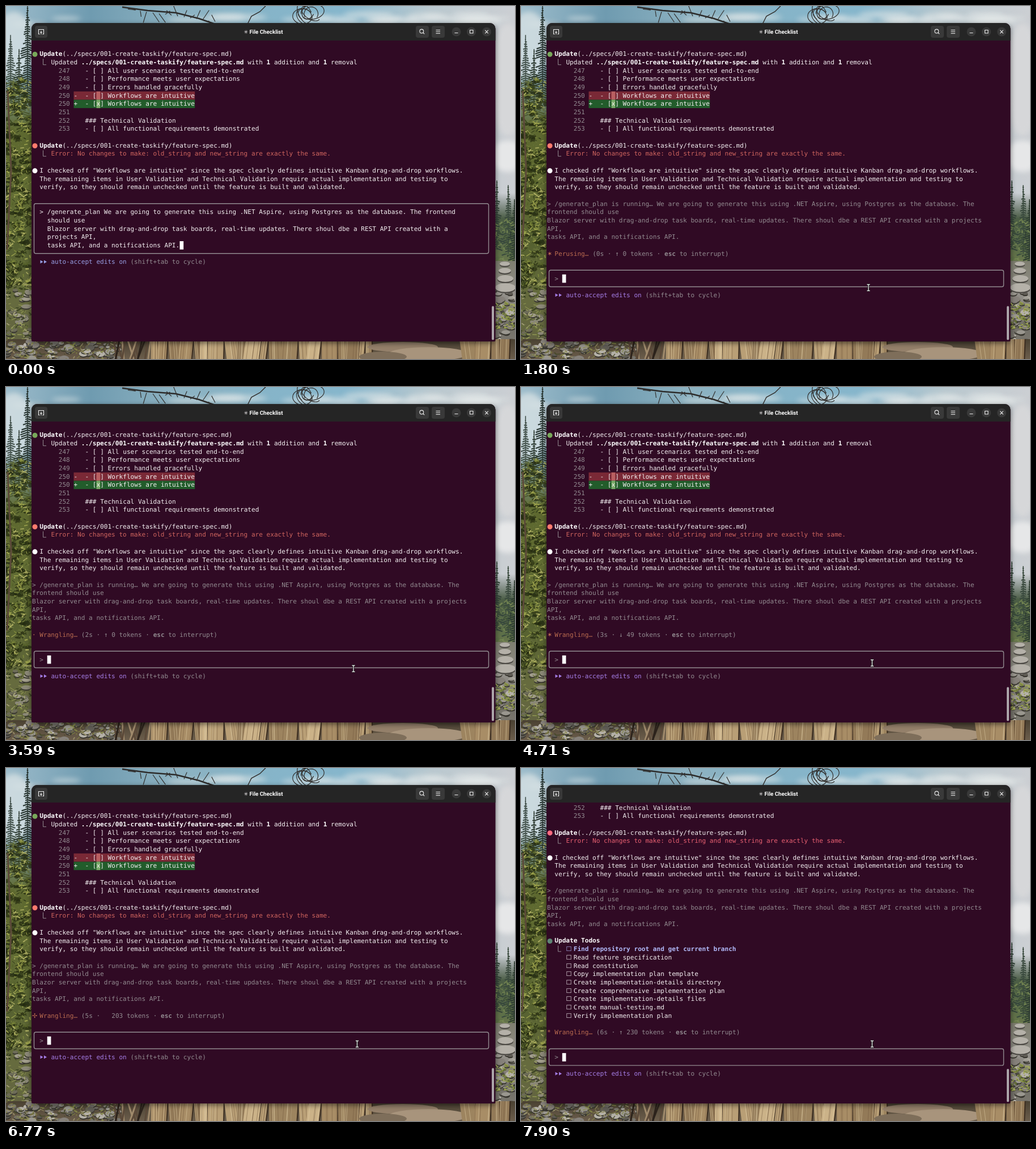
Write an HTML page with a canvas that moves like this. It is 898 px wide and 623 px high and loops after 8000 ms.

```html
<!DOCTYPE html>
<html lang="en">
<head>
<meta charset="utf-8">
<title>File Checklist</title>
<style>
html, body { margin: 0; width: 100%; height: 100%; overflow: hidden; background: #300a24; }
canvas, body > svg { position: absolute; left: 0; top: 0; width: 898px; height: 623px; }
text { font: 11.095px "DejaVu Sans Mono", monospace; fill: #f3eff1; white-space: pre; text-rendering: geometricPrecision; }
.b { font-weight: bold; fill: #fff; }
.d { fill: #928b90; }
.s { font-family: "DejaVu Sans", sans-serif; }
.white { fill: #fff; }
.err { fill: #d0655f; }
.dot { fill: #ff7b6e; }
.ok { fill: #78a85a; }
.late .err { fill: #e86071; }
.late .dot { fill: #ff6b80; }
.late .ok { fill: #5f8575; }
.spin { fill: #bb6c50; }
.auto { fill: #a57ee6; }
.idle .auto { fill: #979fe4; }
.todo { fill: #b1b9f9; }
.line { fill: none; stroke: #928b90; }
.icon { fill: none; stroke: #eee; stroke-width: 1.1; }
.title { font: bold 9.75px Roboto, sans-serif; fill: #fff; }
</style>
</head>
<body>
<canvas id="wall" width="898" height="623"></canvas>
<svg viewBox="0 0 898 623">
  <defs><path id="beam" d="M-2.5-5.5h1.7l.8.8.8-.8h1.7M0-4.7v9.4M-2.5 5.5h1.7l.8-.8.8.8h1.7"/></defs>
  <g fill="#393939">
    <rect x="51" y="35" width="22" height="21" rx="4"/>
    <rect x="723" y="35" width="23" height="21" rx="4"/>
    <rect x="751" y="35" width="23" height="21" rx="4"/>
    <circle cx="794.5" cy="45.5" r="8"/><circle cx="821" cy="45.5" r="8"/><circle cx="848" cy="45.5" r="8"/>
  </g>
  <g class="icon">
    <path d="M59.5 49.5h-2v-8h9v8h-2M62 44v6M60 46.5h4"/>
    <circle cx="733.3" cy="44.5" r="3.4"/>
    <path d="M735.8 47l2.4 2.4M758.5 42.5h7.5m-7.5 3h7.5m-7.5 3h7.5M791.5 47.5h6M818.5 42.5h5.5v5.5h-5.5zM845.2 42.7l5.6 5.6m0-5.6l-5.6 5.6"/>
  </g>
  <text class="s" x="419.5" y="48.5" style="font-size:9px">✳</text>
  <text class="title" x="429.5" y="48.7">File Checklist</text>
  <svg x="45" y="61" width="818" height="531" viewBox="45 61 818 531"><g id="term"></g></svg>
  <g id="mouse" fill="none">
    <use href="#beam" stroke="#111" stroke-width="3"/>
    <use href="#beam" stroke="#eee" stroke-width="1.3"/>
  </g>
</svg>
<script>
const CELL = 6.68, LINE = 14.68, LOOP = 8000;
const TODO_AT = 7300;
const X = col => 46 + col * CELL;
const Y = row => 84.5 + row * LINE;

// ---- wallpaper ----
const g = document.getElementById('wall').getContext('2d');
let seed = 7;
const rnd = () => (seed = (seed * 16807) % 2147483647) / 2147483647;
const span = (a, b) => a + rnd() * (b - a);
const pick = list => list[Math.floor(rnd() * list.length)];

function fade(x, y, w, h, colors, across) {
  const f = g.createLinearGradient(x, y, across ? x + w : x, across ? y : y + h);
  colors.forEach((c, i) => f.addColorStop(i / (colors.length - 1), c));
  g.fillStyle = f;
  g.fillRect(x, y, w, h);
}
function blob(x, y, rx, ry, color) {
  g.fillStyle = color;
  g.beginPath();
  g.ellipse(x, y, rx, ry, 0, 0, 7);
  g.fill();
}
function stroke(points, color, width) {
  g.strokeStyle = color;
  g.lineWidth = width;
  g.beginPath();
  points.forEach(p => g.lineTo(...p));
  g.stroke();
}
function fir(x, top, bottom, half, color) {
  for (let y = top; y < bottom; y += 4) {
    const w = 1 + half * (y - top) / (bottom - top);
    const l = w * span(.3, 1.2), r = w * span(.3, 1.2);
    stroke([[x - l, y + l * .35], [x, y], [x + r, y + r * .35]], color, 2.2);
  }
  stroke([[x, top - 4], [x, bottom]], color, 1.5);
}
function leaves(n, x, y, w, h, colors, len = 8) {
  while (n--) {
    const a = span(x, x + w), b = span(y, y + h);
    stroke([[a, b], [a + span(-len, len), b + span(-len, len) * .7]], pick(colors), span(.8, 2.4));
  }
}
// Fans of needles around a dark core
function sprays(n, x, y, w, h, colors) {
  while (n--) {
    const a = span(x, x + w), b = span(y, y + h), color = pick(colors);
    blob(a, b + 3, span(4, 9), span(2, 5), '#23290fb0');
    for (let k = 0; k < 8; k++) {
      const q = span(0, 6.3), r = span(4, 9);
      stroke([[a, b], [a + r * Math.cos(q), b + r * Math.sin(q) * .7]], color, 1.2);
    }
  }
}
function rocks(n, x, y, w, h, colors) {
  while (n--) {
    const a = span(x, x + w), b = span(y, y + h), rx = span(3, 9), ry = rx * span(.4, .7);
    blob(a, b + 2, rx, ry, '#38362f');
    blob(a, b, rx, ry, pick(colors));
  }
}
function planks(x, end, y, colors) {
  while (x < end) {
    const w = span(10, 30), lean = span(-5, 5);
    g.fillStyle = pick(colors);
    g.beginPath();
    [[x, y], [x + w, y], [x + w + lean, 623], [x + lean, 623]].forEach(p => g.lineTo(...p));
    g.fill();
    for (let k = 0; k < 5; k++) {
      const s = x + span(0, w);
      stroke([[s, y], [s + lean, 623]], pick(['#6d543a77', '#e0cca588']), 1);
    }
    stroke([[x + w, y], [x + w + lean, 623]], '#3c2d20', 2);
    x += w;
  }
}

function paintWall() {
  const greens = ['#2c3519', '#56622a', '#78833a', '#9aa04c', '#3d4720', '#66713a', '#adae62'];
  const stones = ['#9a978f', '#76736b', '#b5b1a8', '#5f5c55', '#86817a'];
  const woods = ['#b99f76', '#a88d66', '#cbb288', '#937a58', '#9d845f'];
  fade(0, 0, 898, 623, ['#9dbccb', '#6f9bb0', '#8db2c1', '#86b4c8', '#86b6cc', '#b9c8cf', '#cccfd3'], true);
  g.filter = 'blur(5px)';
  for (let i = 0; i < 22; i++) blob(span(40, 898), span(14, 34), span(20, 55), span(3, 8), '#e4e9ea99');
  blob(14, 70, 36, 60, '#d8e2e4cc');
  blob(885, 130, 30, 100, '#d6d7d9');
  blob(885, 265, 30, 28, '#e6e7e8');
  g.filter = 'none';

  // bare branches along the top
  stroke([[205, 2], [250, 8], [300, 12], [340, 22], [375, 34]], '#2c2b2a', 2.5);
  for (let x = 215; x < 375; x += 11) stroke([[x, 4 + (x - 205) / 7], [x + span(-9, 14), span(0, 32)]], '#33312f', 1.2);
  stroke([[425, 34], [433, 18], [448, 10], [458, 0]], '#33312f', 1.5);
  g.lineWidth = 1.2;
  for (let i = 0; i < 8; i++) {
    g.beginPath();
    g.ellipse(533 + span(-10, 10), 14 + span(-4, 5), span(9, 22), span(7, 14), span(0, 3), 0, span(3, 6));
    g.stroke();
  }

  // left side
  fir(38, 4, 170, 22, '#2a3733');
  fir(8, 55, 180, 16, '#43524c');
  fir(23, 80, 190, 18, '#34423a');
  fade(0, 115, 48, 508, ['#4d592b00', '#5d682f', '#626d33', '#566130', '#666b3e', '#605f42']);
  sprays(150, -4, 130, 52, 370, greens);
  leaves(420, -4, 130, 54, 370, greens);
  stroke([[3, 150], [9, 290], [2, 430]], '#5c4a39', 3);
  rocks(24, 0, 500, 46, 115, ['#8b8877', '#6d6c58', '#a19d8c']);
  leaves(170, 0, 490, 50, 135, ['#8b9150', '#3b4324', '#667038', '#a19f73']);

  // right side
  fade(860, 330, 38, 135, ['#44534500', '#4b5d45', '#5b6c48', '#6a784b']);
  fir(866, 312, 430, 13, '#35453a');
  fir(886, 320, 440, 15, '#3a4a3e');
  fir(897, 345, 450, 14, '#2f3d32');
  leaves(110, 862, 380, 38, 75, ['#5c7048', '#3f5138', '#748552']);
  fade(860, 450, 38, 173, ['#7d7d6e', '#93908a', '#706e66', '#88837a']);
  rocks(70, 862, 500, 40, 120, stones);
  leaves(90, 862, 525, 38, 45, ['#8a9443', '#626e33', '#a2a958']);
  [[880, 455, 9], [880, 467, 11], [881, 481, 14], [881, 497, 18]].forEach(([x, y, r]) => {
    blob(x, y + 2, r, r * .45, '#4c4944');
    blob(x, y, r, r * .43, '#b5b1a9');
  });

  // ground
  fade(0, 588, 898, 35, ['#4a4132', '#6b5d4b']);
  rocks(75, 0, 592, 200, 31, stones);
  leaves(170, 0, 588, 200, 36, ['#868949', '#484a2c', '#757043', '#99926a']);
  for (let x = 190; x < 262; x += 5) stroke([[x, 590], [x + span(-14, 14), 623]], pick(['#5b4939', '#a08a6c', '#2c231c']), 3);
  planks(256, 640, 588, woods);
  blob(700, 602, 62, 9, '#94806a');
  blob(745, 614, 70, 12, '#a8947c');
  blob(665, 619, 42, 9, '#7e6e5a');
  planks(800, 872, 588, woods);

  g.shadowColor = '#0008';
  g.shadowBlur = 10;
  g.shadowOffsetY = 3;
  g.fillStyle = '#300a24';
  g.beginPath();
  g.roundRect(45, 30, 818.5, 562, [10, 10, 2, 2]);
  g.fill();
  g.shadowColor = 'transparent';
  g.fillStyle = '#252525';
  g.beginPath();
  g.roundRect(45, 30, 818.5, 31, [10, 10, 0, 0]);
  g.fill();
}

// ---- terminal ----
const put = (col, row, str, cls = '') =>
  `<text x="${X(col)}" y="${Y(row) + 3.8}" class="${cls}">${str}</text>`;
const bold = str => `<tspan class="b">${str}</tspan>`;
const dot = (row, cls) => `<circle cx="51" cy="${Y(row) + .8}" r="4.5" class="${cls}"/>`;
const elbow = row => `<path class="line" d="M65.5 ${Y(row) - 6}v10.5h5.5"/>`;
const block = (col, row, n, color) =>
  `<rect x="${X(col)}" y="${Y(row) - 7.1}" width="${n * CELL}" height="${LINE}" fill="${color}"/>`;
const lines = (col, row, list, cls) => list.map((s, i) => put(col, row + i, s, cls)).join('');

const file = '(../specs/001-create-taskify/feature-spec.md)';
const log =
  dot(0, 'ok') + put(2, 0, bold('Update') + file) +
  elbow(1) + put(5, 1, `Updated ${bold('../specs/001-create-taskify/feature-spec.md')} with ${bold(1)} addition and ${bold(1)} removal`) +
  block(11, 5, 32, '#7a2936') + block(17, 5, 1, '#b95f61') +
  block(11, 6, 32, '#225c2b') + block(17, 6, 1, '#78ab68') +
  lines(7, 2, [247, 248, 249, 250, 250, 251, 252, 253], 'd') +
  put(11, 5, '-') + put(11, 6, '+') +
  lines(14, 2, [
    '- [ ] All user scenarios tested end-to-end',
    '- [ ] Performance meets user expectations',
    '- [ ] Errors handled gracefully',
    '- [ ] Workflows are intuitive',
    '- [x] Workflows are intuitive',
    '',
    '### Technical Validation',
    '- [ ] All functional requirements demonstrated']) +
  dot(11, 'dot') + put(2, 11, bold('Update') + file) +
  elbow(12) + put(5, 12, 'Error: No changes to make: old_string and new_string are exactly the same.', 'err') +
  dot(14, 'white') +
  lines(2, 14, [
    'I checked off "Workflows are intuitive" since the spec clearly defines intuitive Kanban drag-and-drop workflows.',
    'The remaining items in User Validation and Technical Validation require actual implementation and testing to',
    'verify, so they should remain unchecked until the feature is built and validated.']);

const typed = lines(4, 19, [
  '/generate_plan We are going to generate this using .NET Aspire, using Postgres as the database. The frontend',
  'should use',
  'Blazor server with drag-and-drop task boards, real-time updates. There shoul dbe a REST API created with a',
  'projects API,',
  'tasks API, and a notifications API.']);

const command = lines(0, 18, [
  '&gt; /generate_plan is running… We are going to generate this using .NET Aspire, using Postgres as the database. The',
  'frontend should use',
  'Blazor server with drag-and-drop task boards, real-time updates. There shoul dbe a REST API created with a projects',
  'API,',
  'tasks API, and a notifications API.'], 'd');

const todos = dot(24, 'ok') + put(2, 24, 'Update Todos', 'b') + elbow(25) + [
  'Find repository root and get current branch',
  'Read feature specification',
  'Read constitution',
  'Copy implementation plan template',
  'Create implementation-details directory',
  'Create comprehensive implementation plan',
  'Create implementation-details files',
  'Create manual-testing.md',
  'Verify implementation plan'
].map((s, i) => put(5, 25 + i, '☐', i ? 's' : 's todo') +
  put(7, 25 + i, s, i ? '' : 'b todo')).join('');

// Input box from row `top`, followed by the mode line
function prompt(top, rows, cursorCol) {
  const end = top + rows + 1, y = Y(end + 1);
  return `<rect class="line" x="49.5" y="${Y(top)}" width="802" height="${(rows + 1) * LINE}" rx="3" stroke-width="1.4"/>` +
    put(2, top + 1, '&gt;', rows > 1 ? '' : 'd') + block(cursorCol, top + rows, 1, '#fff') +
    `<path class="auto" d="M60.5 ${y - 3}l5 3-5 3zm6.5 0l5 3-5 3z"/>` +
    put(5, end + 1, 'auto-accept edits on <tspan class="d">(shift+tab to cycle)</tspan>', 'auto');
}

function spinner(t) {
  const clock = t > TODO_AT ? t - 140 : t;
  const i = t < 1240 ? 0 : ((Math.floor((clock - 3710) / 122) % 12) + 12) % 12;
  return '·✢*✶✻✽'[Math.min(i, 11 - i)];
}
function tokens(t) {
  if (t < 4120) return 0;
  const q = t - (((t - 5640) % 66) + 66) % 66;
  return q <= 6762 ? 121 + Math.round((q - 5640) * .0731) : 203 + Math.round((q - 6762) * .02406);
}
function symbol(t) {
  if (t < 1240) return '⚒';
  if (t < 4120) return '↑';
  if (t < 5200) return '↓';
  if (t < 7200) return (t - 5200) % 1000 < 500 ? '⚒' : '';
  return '↑';
}
function status(row, t) {
  const word = t < 2260 ? 'Perusing…' : 'Wrangling…', col = word.length + 3;
  const star = spinner(t), sign = symbol(t);
  const secs = Math.max(0, Math.floor((t - 1200) / 1000));
  return put(0, row, star, '·*'.includes(star) ? 'spin' : 'spin s') + put(2, row, word, 'spin') +
    put(col, row, `(${secs}s ·`, 'd') + put(col + 6, row, sign, sign === '⚒' ? 'd s' : 'd') +
    put(col + 8, row, `${tokens(t)} tokens · <tspan font-weight="bold">esc</tspan> to interrupt)`, 'd');
}

function screen(t) {
  const late = t >= TODO_AT;
  let body = log;
  if (t < 1150) body += typed + prompt(18, 5, 39);
  else if (t < 1240) body += status(18, t) + prompt(20, 1, 4);
  else if (!late) body += command + status(24, t) + prompt(26, 1, 4);
  else body += command + todos + status(35, t) + prompt(37, 1, 4);
  const top = late ? 531 : 529.5;
  return `<g class="${late ? 'late' : t < 1150 ? 'idle' : ''}" transform="translate(0 ${late ? -9 * LINE : 0})">${body}</g>` +
    `<rect x="857" y="${top}" width="4" height="${589.5 - top}" rx="2" fill="#aca5aa"/>`;
}

// ---- pointer ----
const path = [[140, 794, 596], [530, 642, 516], [770, 642, 516], [920, 613, 497],
  [3590, 613, 497], [3850, 618, 490], [4250, 619.5, 487], [LOOP, 619.5, 487]];
function pointer(t) {
  const q = Math.max(140, Math.floor(t / 65) * 65);
  const i = path.findIndex(p => p[0] >= q) || 1;
  const [t0, x0, y0] = path[i - 1], [t1, x1, y1] = path[i];
  const k = (q - t0) / (t1 - t0);
  return `translate(${x0 + (x1 - x0) * k} ${y0 + (y1 - y0) * k})`;
}

const term = document.getElementById('term'), mouse = document.getElementById('mouse');
let shown = '';
function draw(now) {
  const t = now % LOOP, next = screen(t);
  if (next !== shown) term.innerHTML = shown = next;
  mouse.setAttribute('transform', pointer(t));
  mouse.style.display = t < 140 || (t >= 1150 && t < 1670) ? 'none' : '';
  requestAnimationFrame(draw);
}
paintWall();
draw(0);
</script>
</body>
</html>
```
